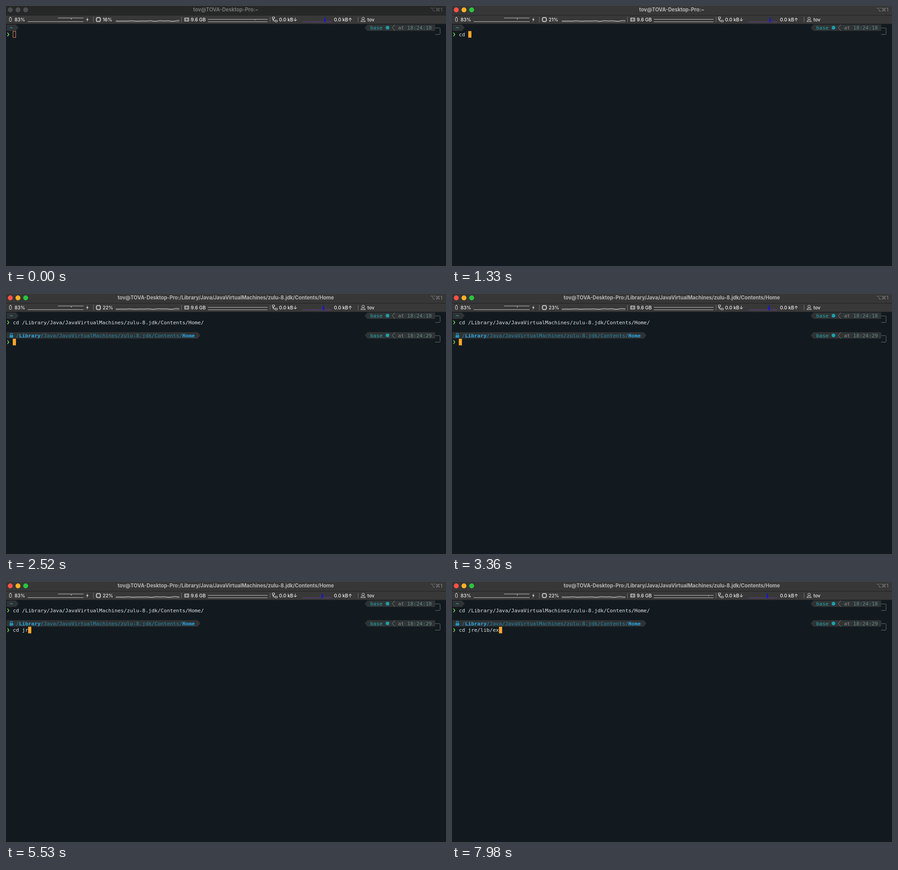
Animation of 974 by 575 pixels, one loop 8 s. Source, as an HTML page:

```html
<!DOCTYPE html>
<html lang="en">
<head>
<meta charset="utf-8">
<title>Terminal</title>
<style>
html, body { margin: 0; width: 100%; height: 100%; overflow: hidden; background: #121a20; }
svg { display: block; }
text { white-space: pre; }
.ui { font: 500 10.4px Inter, "DejaVu Sans", sans-serif; fill: #f0f0f0; }
.title { font: 700 11.2px Inter, sans-serif; text-anchor: middle; }
.keys { font: 500 11px Inter, "DejaVu Sans", sans-serif; text-anchor: end; }
.mono { font: 11.33px "DejaVu Sans Mono", monospace; fill: #e4e4e4; }
.bold { font-weight: 700; fill: #27a9ea; }
.icon { fill: none; stroke: #e2e2e2; stroke-width: 1; }
.plot { fill: none; stroke: #c4c4c4; stroke-width: 1; }
</style>
</head>
<body>
<svg width="974" height="575" viewBox="0 0 974 575">
  <rect width="974" height="575" fill="#121a20"/>
  <rect id="bar" width="974" height="20"/>
  <rect y="20" width="974" height="1" fill="#1d1f20"/>
  <rect y="21" width="974" height="18.5" fill="#383838"/>
  <g id="lights"><circle cx="9.5" cy="8.5" r="5.4"/><circle cx="26.5" cy="8.5" r="5.4"/><circle cx="43.5" cy="8.5" r="5.4"/></g>
  <text id="title" class="title" x="486.5" y="12"/>
  <text id="keys" class="keys" x="966" y="11.5">⌥⌘1</text>

  <g class="icon">
    <rect x="7.5" y="26" width="4.5" height="8" rx="1.2"/><path d="M8.7 24.7h2.2"/>
    <path d="M181.5 25l-4 5.5h2.5l-1.2 4.5 3.8-5.8h-2.6z" fill="#e2e2e2" stroke="none"/>
    <rect x="200.5" y="26" width="8" height="8" stroke-width="1.4"/>
    <path d="M202 24.8h1m1 0h1m1 0h1M202 35.2h1m1 0h1m1 0h1M199.2 27.5v1m0 1v1m0 1v1M209.8 27.5v1m0 1v1m0 1v1"/>
    <path d="M395.5 26.5h9v7h-9zM398 26.5v7M402 26.5v7" stroke-width="1.2"/>
    <path d="M589.5 24.5h5v3.5h-5zM595.5 31.5h5v3.5h-5zM591.5 28v5h4M589.5 30h4"/>
    <circle cx="790.5" cy="27.6" r="2.7"/><path d="M785.8 34.5q0-3.6 4.7-3.6t4.7 3.6z"/>
    <path d="M193.5 24v12M388.5 24v12M584.5 24v12M779.5 24v12" stroke="#757575"/>
  </g>
  <g class="ui">
    <text x="19" y="34">83%</text><text id="cpu" x="214" y="34"/>
    <text x="409" y="34">9.6 GB</text><text id="down" x="604.5" y="34"/>
    <text x="726" y="34">0.0 kB↑</text><text x="800" y="34">tov</text>
  </g>
  <g class="plot">
    <path d="M48 34.5H171.5M115 26.5H171.5M144.5 27v3"/>
    <path d="M243 35H384" stroke="#858585"/><path id="cpuPlot" stroke="#e6e6e6"/>
    <path d="M447 29.5H579M447 34.8H579"/><path id="memNotch"/>
    <path d="M657 35H720.5" stroke="#69439a"/>
    <path id="netBump" stroke="#a02a75"/>
    <path id="netSpike" fill="#1610e8" stroke="#1610e8" stroke-width=".7"/>
  </g>

  <g id="prompt1"></g>
  <g id="prompt2"></g>
  <rect id="mark" x="35.6" y="55.5" width="402.6" height="14.5" fill="#e9e9e2"/>
  <text id="cmd1" class="mono" y="66.5"></text>
  <text id="cmd2" class="mono" y="110"></text>
  <rect id="cursor"/>
</svg>
<script>
const LOOP = 8000, CELL = 6.82, LEFT = 1.5;
const FOCUS = 210, ENTER = 2240;
const PATH = "/Library/Java/JavaVirtualMachines/zulu-8.jdk/Contents/Home";
const HOST = "tov@TOVA-Desktop-Pro:";
const TYPED = [
  [[0, ""], [1050, "c"], [1120, "cd"], [1260, "cd "], [1680, `cd ${PATH}/`]],
  [[0, ""], [3570, "c"], [3710, "cd"], [3850, "cd "], [5250, "cd j"], [5460, "cd jr"],
   [5670, "cd jre"], [6300, "cd jre/"], [6720, "cd jre/l"], [6930, "cd jre/li"],
   [7070, "cd jre/lib"], [7350, "cd jre/lib/"], [7700, "cd jre/lib/e"], [7840, "cd jre/lib/ex"]]
];
const CPU = [16, 16, 21, 22, 23, 24, 22, 20, 22];
const LIGHTS = ["#ff5148", "#fdb225", "#2ac63c"];

const $ = id => document.getElementById(id);
const col = n => LEFT + n * CELL;
const set = (id, attrs) => { for (const k in attrs) $(id).setAttribute(k, attrs[k]); };
const at = (steps, t) => steps.filter(s => s[0] <= t).pop()[1];

// Two-line prompt: left path segment, right status segment, input chevron
function prompt(id, y, cells, left, clock) {
  const top = y - 7, bottom = y + 7, end = col(cells);
  $(id).innerHTML = `
    <path fill="#303334" d="M${LEFT} ${top}H${end}l6 7-6 7H${LEFT}z M800 ${top}H950V${bottom}H800l-6-7z"/>
    ${left}
    <g class="mono">
      <text x="${col(118)}" y="${y + 4}" style="fill:#22a7b0">base</text>
      <text x="${col(127)}" y="${y + 4}" style="fill:#858888">at <tspan fill="#628b8c">${clock}</tspan></text>
    </g>
    <circle cx="844.5" cy="${y}" r="4" fill="#1c9fa8"/>
    <path d="M861 ${top}l-6 7 6 7" fill="none" stroke="#858888" stroke-width=".9"/>
    <path d="M950 ${y + .5}h9q2 0 2 2v10.5q0 2-2 2h-9" fill="none" stroke="#666c70"/>
    <path d="M3.2 ${y + 11}l3 4-3 4" fill="none" stroke="#79d94c" stroke-width="1.7"/>`;
}
const parts = PATH.split("/Library").pop().replace("Home", "");
prompt("prompt1", 48, 3, `<text class="mono bold" x="${col(1)}" y="52">~</text>`, "18:24:18");
prompt("prompt2", 91.5, 62, `
  <path d="M9.8 91v-2q0-2 2.2-2t2.2 2v2" fill="none" stroke="#2094c0" stroke-width="1.3"/>
  <rect x="8" y="91" width="8" height="5.5" rx=".8" fill="#2094c0"/>
  <text class="mono" x="${col(3)}" y="95.5" style="fill:#1c87ad">/<tspan class="bold">Library</tspan>${parts}<tspan class="bold">Home</tspan></text>`,
  "18:24:29");
set("cmd1", { x: col(2) });
set("cmd2", { x: col(2) });

function cpuLine(n) {
  let d = "";
  for (let x = 243; x <= 384; x += 3) {
    const u = x + n * 1.3;
    const swell = x > 315 ? .45 : .2;
    const y = 33 + swell * (Math.sin(u * .31) + Math.sin(u * .173 + 1)) - (x > 315 ? .2 : 0);
    d += `${d ? "L" : "M"}${x} ${y.toFixed(2)}`;
  }
  return d;
}

function status(n) {
  $("cpu").textContent = CPU[n] + "%";
  $("down").textContent = (n === 7 ? "1.0" : "0.0") + " kB↓";
  const spike = 706 - n;
  set("cpuPlot", { d: cpuLine(n) });
  set("netSpike", { d: `M${spike - 1.5} 35L${spike - .4} 25h.8L${spike + 1.5} 35z` });
  set("netBump", { d: `M${680 - n} 35.3h4M${716 - n} 35.3h4` });
  set("memNotch", { d: n < 2 ? "M551.5 29v2.5" : n > 6 ? `M${571 - 3 * (n - 7)} 29v2.5` : "" });
}

function draw(t) {
  const focused = t >= FOCUS, entered = t >= ENTER;
  const first = at(TYPED[0], t), second = at(TYPED[1], t);
  const pasted = first.length > 3 && !entered;

  set("bar", { fill: focused ? "#373737" : "#262828" });
  [...$("lights").children].forEach((c, i) => c.setAttribute("fill", focused ? LIGHTS[i] : "#4c4f4f"));
  $("title").textContent = HOST + (entered ? PATH : "~");
  set("title", { fill: focused ? "#b4b4b4" : "#747676" });
  set("keys", { fill: focused ? "#7d7d7d" : "#5d6060" });
  status(Math.floor((t + 720) / 1000));

  set("mark", { visibility: pasted ? "visible" : "hidden" });
  $("cmd1").innerHTML = pasted
    ? `cd <tspan fill="#20262a">${first.slice(3)}</tspan>` : first;
  $("cmd2").textContent = second;
  set("prompt2", { visibility: entered ? "visible" : "hidden" });

  const x = Math.round(col(2 + (entered ? second : first).length)), y = entered ? 99 : 55.5;
  set("cursor", focused
    ? { x, y, width: 7, height: 14.5, fill: "#faa62b", stroke: "none" }
    : { x: x + .5, y: y + .5, width: 6, height: 13.5, fill: "none", stroke: "#e58a5e" });
}

const start = performance.now();
function tick() {
  draw((performance.now() - start) % LOOP);
  requestAnimationFrame(tick);
}
tick();
</script>
</body>
</html>
```
